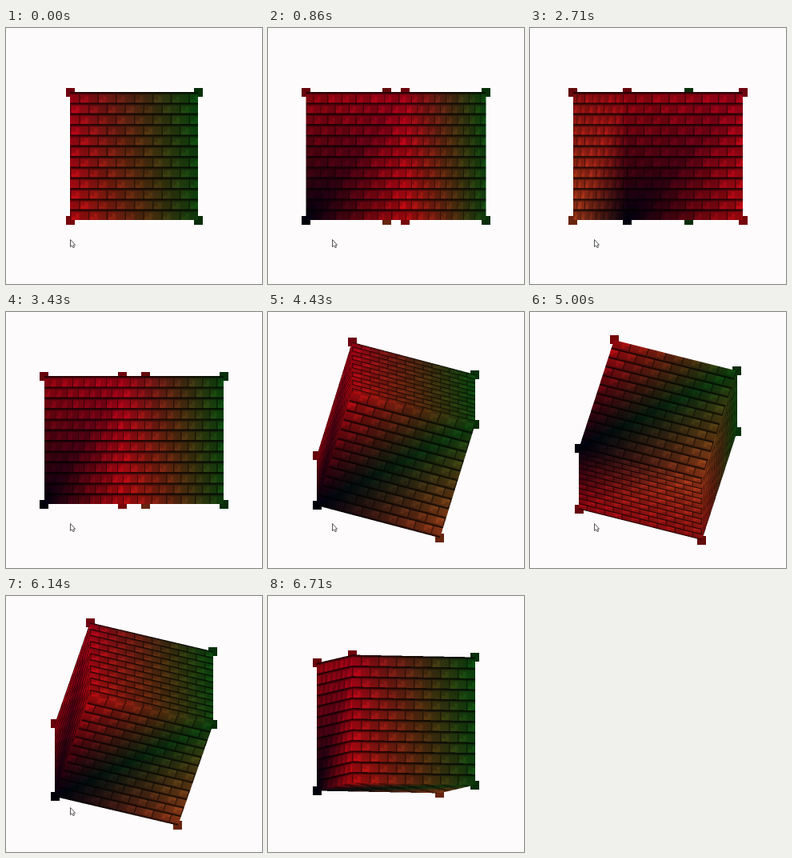
Animation, 320 px wide and 320 px high, one loop 6.85 s. Source, as an HTML page with a canvas:

```html
<!DOCTYPE html>
<html lang="en">
<head>
<meta charset="utf-8">
<title>Brick cube</title>
<style>
  html, body { margin: 0; width: 100%; height: 100%; overflow: hidden; background: #fdfbfc; }
  canvas { display: block; width: 320px; height: 320px; }
</style>
</head>
<body>
<canvas id="stage" width="320" height="320"></canvas>
<script>
const SIZE = 320, CENTER = 160, HALF = 80;
const SCALE = 2, WIDE = SIZE * SCALE; // drawn larger, then smoothed down
const LOOP = 6850, STEPS = 48, SPEED = 0.09; // degrees per ms
const ctx = document.getElementById('stage').getContext('2d');
const buffer = document.createElement('canvas');
buffer.width = buffer.height = WIDE;
const bufferCtx = buffer.getContext('2d');

// Four top corners, then the same four at the bottom.
const plan = [[-1, 1], [1, 1], [-1, -1], [1, -1]];
const corners = [1, -1].flatMap(y => plan.map(([x, z]) => [x * HALF, y * HALF, z * HALF]));
const colors = [
  [240, 4, 34], [12, 105, 20], [222, 8, 24], [215, 24, 24],
  [255, 14, 22], [22, 98, 20], [0, 0, 22], [222, 80, 34]
];
// Texture corners: top left, top right, bottom left, bottom right.
const faces = [
  [0, 1, 4, 5], [2, 0, 6, 4], [3, 2, 7, 6], [1, 3, 5, 7], [7, 6, 5, 4], [2, 3, 0, 1]
];

// Turns one way from `start`, reverses at `turn`, and stops at `end`.
function swing(t, start, turn, end) {
  const time = Math.min(Math.max(t, start), end);
  return SPEED * (time < turn ? time - start : 2 * turn - start - time);
}

function project([x, y, z], yaw, pitch) {
  const cy = Math.cos(yaw), sy = Math.sin(yaw);
  const cp = Math.cos(pitch), sp = Math.sin(pitch);
  const depth = z * cy - x * sy;
  return {
    x: CENTER + x * cy + z * sy,
    y: CENTER - (y * cp + depth * sp),
    z: depth * cp - y * sp
  };
}

// Brightness of the wall: dark mortar, plain bricks, an L-shaped glint low on the left.
function brick(u, v) {
  const row = Math.floor(v * 12);
  const across = u * 7 + (row % 2 ? 0 : 0.5);
  const column = Math.floor(across);
  const fx = across - column, fy = v * 12 - row;
  if (fy < 0.12) return 0.16;
  if (fy < 0.22 || fx < 0.07) return 0.34;
  const tone = 0.6 + 0.03 * Math.sin(row * 7.3 + column * 4.1) - 0.06 * fx;
  const glint = fx < 0.5 && fy > 0.4 && (fx > 0.32 || fy > 0.7);
  return glint ? tone + 0.18 : tone + 0.08 * fy;
}

function putPixel(data, x, y, color, shade) {
  const at = (y * WIDE + x) * 4;
  for (let i = 0; i < 3; i++) data[at + i] = color[i] * shade;
  data[at + 3] = 255;
}

function drawMarker(data, point, color) {
  const left = Math.round(point.x - 5.5) * SCALE, top = Math.round(point.y - 5.5) * SCALE;
  const side = 11 * SCALE;
  for (let y = top; y < top + side; y++)
    for (let x = left; x < left + side; x++) putPixel(data, x, y, color, 0.46);
}

function drawFace(data, face, points) {
  const [p, q, r, s] = face.map(i => points[i]);
  const [tl, tr, bl, br] = face.map(i => colors[i]);
  if (p.z + q.z + r.z + s.z <= 0.01) return;
  const ax = q.x - p.x, ay = q.y - p.y, bx = r.x - p.x, by = r.y - p.y;
  const area = ax * by - ay * bx;
  if (Math.abs(area) < 1) return;
  const xs = [p.x, q.x, r.x, s.x], ys = [p.y, q.y, r.y, s.y];
  const left = Math.floor(Math.min(...xs) * SCALE), right = Math.ceil(Math.max(...xs) * SCALE);
  const top = Math.floor(Math.min(...ys) * SCALE), bottom = Math.ceil(Math.max(...ys) * SCALE);
  const color = [0, 0, 0];
  for (let y = top; y < bottom; y++) {
    for (let x = left; x < right; x++) {
      const dx = (x + 0.5) / SCALE - p.x, dy = (y + 0.5) / SCALE - p.y;
      const u = (dx * by - dy * bx) / area, v = (dy * ax - dx * ay) / area;
      if (u < 0 || u > 1 || v < 0 || v > 1) continue;
      // Two triangles meet on the diagonal from top right to bottom left.
      const upper = u + v < 1;
      const base = upper ? tl : br;
      const toRight = upper ? u : 1 - v, toLeft = upper ? v : 1 - u;
      for (let i = 0; i < 3; i++)
        color[i] = base[i] * (1 - toRight - toLeft) + tr[i] * toRight + bl[i] * toLeft;
      putPixel(data, x, y, color, brick(u, v));
    }
  }
}

function drawCursor() {
  const outline = new Path2D('M80.5 264.5V273.5L82.5 271.8L84 274.7L85.5 274L84.3 271.2H86.5Z');
  ctx.fillStyle = '#fff';
  ctx.strokeStyle = '#444';
  ctx.lineWidth = 0.9;
  ctx.fill(outline);
  ctx.stroke(outline);
}

function render(step) {
  const t = step * LOOP / STEPS, radians = Math.PI / 180;
  const yaw = swing(t, 289, 2067, 3668) * radians;
  const pitch = swing(t, 3680, 5215, LOOP) * radians;
  const points = corners.map(corner => project(corner, yaw, pitch));
  bufferCtx.fillStyle = '#fdfbfc';
  bufferCtx.fillRect(0, 0, WIDE, WIDE);
  const image = bufferCtx.getImageData(0, 0, WIDE, WIDE);
  points.map((point, i) => ({ point, color: colors[i] }))
    .sort((a, b) => a.point.z - b.point.z)
    .forEach(({ point, color }) => drawMarker(image.data, point, color));
  faces.forEach(face => drawFace(image.data, face, points));
  bufferCtx.putImageData(image, 0, 0);
  ctx.drawImage(buffer, 0, 0, SIZE, SIZE);
  if (step < STEPS - 1) drawCursor();
}

const begin = performance.now();
let shown = -1;
function tick() {
  const t = (performance.now() - begin) % LOOP;
  const step = Math.floor(t / LOOP * STEPS);
  if (step !== shown) render(shown = step);
  requestAnimationFrame(tick);
}
tick();
</script>
</body>
</html>
```
